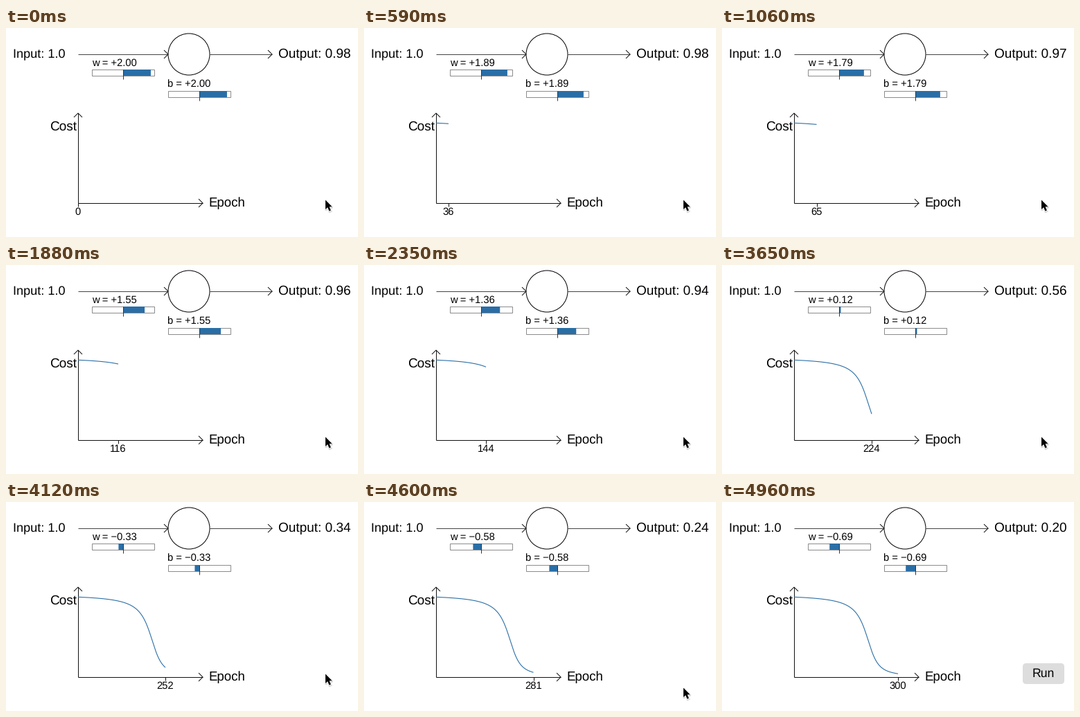
Write a matplotlib script that moves like this. It is 508 by 302 pixels and loops after 5660 ms.

```python
import math

import matplotlib.pyplot as plt
import numpy as np
from matplotlib.animation import FuncAnimation
from matplotlib.patches import Circle, FancyBboxPatch, Polygon, Rectangle

W, H, DPI = 508, 302, 100
PX = 72 / DPI                    # points per pixel
LOOP, INTERVAL, STEP = 5660, 20, 118
LAST_STEP, EPOCHS = 42, 300
RATE, START = 0.15, 2.0
BLUE, BLACK, GREY = "#2a6ea6", "#111111", "#8c8c8c"
AXIS_X, AXIS_Y = 104, 253

plt.rcParams["font.family"] = "Liberation Sans"
plt.rcParams["text.hinting"] = "none"


def sigmoid(z):
    return 1 / (1 + math.exp(-z))


def train():
    """Gradient descent on one sigmoid neuron: input 1, wanted output 0.

    Weight and bias start equal and so stay equal; values are those
    after each epoch's update.
    """
    w = START
    weights, outputs = [], []
    for _ in range(EPOCHS + 1):
        a = sigmoid(2 * w)
        w -= RATE * a * a * (1 - a)
        weights.append(w)
        outputs.append(sigmoid(2 * w))
    return np.array(weights), np.array(outputs)


weights, outputs = train()
curve_x = AXIS_X + np.arange(EPOCHS + 1) / 2
curve_y = AXIS_Y - 240 * outputs ** 2 / 2

fig = plt.figure(figsize=(W / DPI, H / DPI), dpi=DPI, facecolor="white")
ax = fig.add_axes([0, 0, 1, 1])
ax.set_xlim(0, W)
ax.set_ylim(H, 0)
ax.axis("off")


def line(xs, ys, color=BLACK, width=1.0, z=3):
    return ax.plot(xs, ys, color=color, lw=width * PX, zorder=z,
                   solid_capstyle="butt", solid_joinstyle="miter")[0]


def label(x, y, text, size, ha="left", z=4):
    return ax.text(x, y, text, size=size * PX, ha=ha, va="baseline",
                   color="black", zorder=z)


def arrow(x0, y0, x1, y1, color=BLACK):
    """Straight arrow, pointing right or up, with an open head."""
    line([x0, x1], [y0, y1], color)
    if y0 == y1:
        line([x1 - 6, x1, x1 - 6], [y1 - 6, y1, y1 + 6])
    else:
        line([x1 - 6, x1, x1 + 6], [y1 + 6, y1, y1 + 6])


class Slider:
    """Named value with a bar that grows from a centre tick."""

    def __init__(self, name, x, y):
        self.name = name
        self.text = label(x - (name == "b"), y - 5, "", 14.8)
        ax.add_patch(Rectangle((x, y), 90, 9, fill=False, ec=GREY, lw=PX,
                               zorder=2))
        self.bar = Rectangle((x + 45, y), 0, 9, fc=BLUE, lw=0, zorder=3,
                             snap=False)
        ax.add_patch(self.bar)
        line([x + 45, x + 45], [y, y + 14], "#333333", z=4)

    def show(self, value):
        number = f"{value:+.2f}".replace("-", "\u2212")
        self.text.set_text(f"{self.name} = {number}")
        self.bar.set_width(20 * value)


# Neuron
arrow(104, 38, 234, 38, "#444444")
arrow(294, 38, 384, 38, "#444444")
ax.add_patch(Circle((264, 38), 30, fc="white", ec="black", lw=PX, zorder=3))
label(10.5, 43, "Input: 1.0", 18.2)
output_text = label(393, 43, "", 19)
sliders = [Slider("w", 124, 60), Slider("b", 234, 91)]

# Cost graph
arrow(AXIS_X, AXIS_Y, AXIS_X, 123)
arrow(AXIS_X, AXIS_Y, 284, AXIS_Y)
label(63, 148, "Cost", 19)
label(292.5, 258, "Epoch", 18.7)
curve = line([], [], BLUE, 1.1)
tick = line([], [])
epoch_text = label(0, 270, "", 14.8, ha="center")

# Run button
button = FancyBboxPatch((438, 237), 52, 22, fc="#dddddd", ec="none",
                        boxstyle="round,pad=4,rounding_size=5", zorder=5)
ax.add_patch(button)
button_text = label(464, 253, "Run", 17.6, ha="center", z=6)

# Mouse pointer: shadow, white rim, black body
POINTER = 1.08 * np.array([(0, 0), (0, 12.6), (2.9, 9.9), (5, 14.9),
                           (7.3, 13.9), (5.2, 9.1), (9, 9.1)])
SHADOW_SHIFT = np.array([0.4, 1.2])
shadow = Polygon(POINTER, fc="black", ec="black", alpha=0.16, lw=2.5 * PX,
                 zorder=6)
rim = Polygon(POINTER, fc="white", ec="white", lw=2 * PX, zorder=7)
body = Polygon(POINTER, fc="black", lw=0, zorder=8)
for part in (shadow, rim, body):
    ax.add_patch(part)


def place_pointer(step):
    shape = POINTER + (461, 248.5 + 5 * max(0, step - 37) ** 2)
    shadow.set_xy(shape + SHADOW_SHIFT)
    rim.set_xy(shape)
    body.set_xy(shape)


def update(frame):
    step = min(LAST_STEP, (frame * INTERVAL + 20) // STEP)
    epoch = min(EPOCHS, math.ceil(step * 36 / 5))
    x = curve_x[epoch]
    for slider in sliders:
        slider.show(weights[epoch])
    output_text.set_text(f"Output: {outputs[epoch]:.2f}")
    curve.set_data(curve_x[:epoch + 1], curve_y[:epoch + 1])
    tick.set_data([x, x], [AXIS_Y, AXIS_Y + 5])
    epoch_text.set_text(str(epoch))
    epoch_text.set_x(x)
    place_pointer(step)
    done = epoch == EPOCHS
    button.set_visible(done)
    button_text.set_visible(done)
    return []


anim = FuncAnimation(fig, update, frames=LOOP // INTERVAL, interval=INTERVAL,
                     init_func=lambda: update(0), repeat=True, repeat_delay=0,
                     blit=False, cache_frame_data=False)
plt.show()
```
